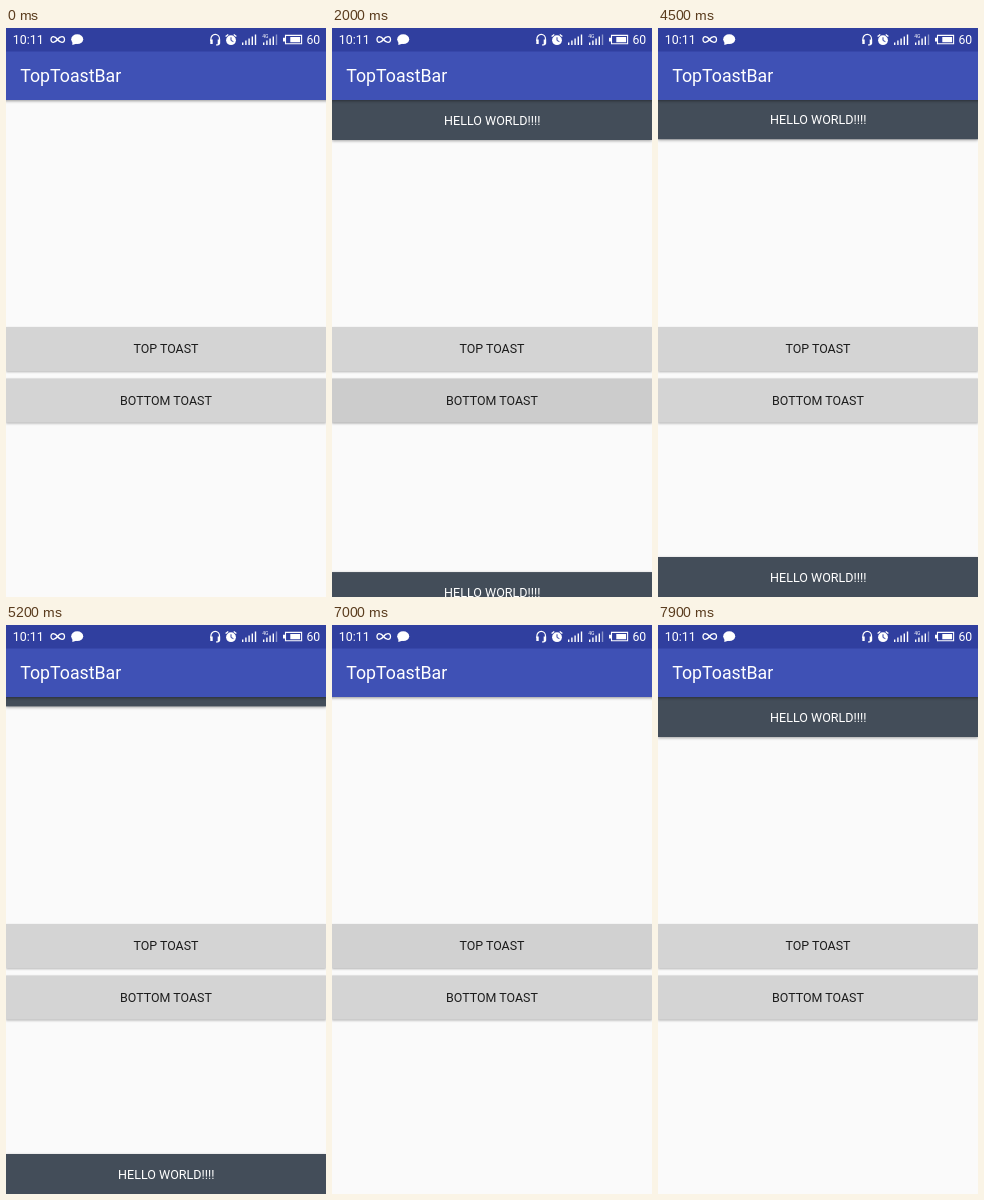
These frames come from a looping animation (320 px wide and 569 px high, 8000 ms). An HTML page:

```html
<!DOCTYPE html>
<html lang="en">
<meta charset="utf-8">
<title>Toast bars</title>
<style>
  html, body { margin: 0; height: 100%; overflow: hidden; background: #fafafa; }
  svg { display: block; width: 100vw; height: 100vh; font-family: Roboto, sans-serif; }
  .label { font-size: 12.44px; text-anchor: middle; }
  .toast { fill: #434d59; filter: drop-shadow(0 1px 1.5px rgba(0, 0, 0, .35)); }
  .bar { filter: drop-shadow(0 1.5px 1.8px rgba(0, 0, 0, .4)); }
  .button { fill: #d4d4d4; filter: drop-shadow(0 1px 1px rgba(0, 0, 0, .28)); }
  .line { fill: none; stroke: #fff; }
</style>
<svg viewBox="0 0 320 569" preserveAspectRatio="none">
  <rect width="320" height="569" fill="#fafafa"/>

  <rect class="button" y="299" width="320" height="44"/>
  <rect class="press" y="299" width="320" height="45" opacity="0"/>
  <text class="label" x="160" y="325.4" fill="#1c1c1c">TOP TOAST</text>
  <rect class="button" y="350.5" width="320" height="44"/>
  <rect class="press" y="350.5" width="320" height="45" opacity="0"/>
  <text class="label" x="160" y="376.9" fill="#1c1c1c">BOTTOM TOAST</text>

  <g id="top">
    <rect class="toast" y="72" width="320" height="40"/>
    <text class="label" x="160.3" y="96.9" fill="#fff" style="font-size:12.55px">HELLO WORLD!!!!</text>
  </g>
  <g id="bottom">
    <rect class="toast" y="529" width="320" height="40"/>
    <text class="label" x="160.3" y="553.7" fill="#fff" style="font-size:12.55px">HELLO WORLD!!!!</text>
  </g>

  <rect class="bar" x="-6" width="332" height="72" fill="#3f51b5"/>
  <rect width="320" height="23.5" fill="#303f9f"/>
  <text x="14.2" y="54" font-size="17.78" fill="#fff">TopToastBar</text>

  <!-- status icons -->
  <g fill="#fff">
    <text x="6.8" y="15.8" font-size="12.4">10:11</text>
    <text x="300.4" y="15.8" font-size="12.2">60</text>
    <path class="line" stroke-width="1.3" d="M51.5 11.5C49 8 45 7.5 45 11.5S49 15 51.5 11.5S58.5 7.5 58.5 11.5S54 15 51.5 11.5Z"/>
    <ellipse cx="71.2" cy="11.2" rx="6" ry="4.9"/>
    <path d="M66.5 13L66.3 17L71 15.5Z"/>
    <path class="line" stroke-width="1.2" d="M204.9 13V11A4.3 4.6 0 0 1 213.5 11V15Q213.5 17 210 17"/>
    <path d="M204.3 11.5h2.4v4.5h-2.4zM211.7 11.5h2.4v4.5h-2.4z"/>
    <circle cx="225" cy="12.2" r="4.9"/>
    <path class="line" stroke-width="1.3" d="M219.6 8.6L222.3 6.4M230.4 8.6L227.7 6.4"/>
    <path class="line" style="stroke:#303f9f" d="M225 9.3V12.5L227.4 13.6"/>
    <g id="signal"></g>
    <text x="256.2" y="10" font-size="5">4G</text>
    <path class="line" stroke-width="1.1" d="M279.5 7.4H295.6V15.8H279.5Z"/>
    <path d="M277 9.8h2v3.8h-2zM284.3 9h9.8v5.3h-9.8z"/>
  </g>
</svg>
<script>
  const LOOP = 8000, HEIGHT = 40;
  const clamp = x => Math.min(1, Math.max(0, x));
  const byId = id => document.getElementById(id);
  const presses = document.querySelectorAll('.press');

  // Two rows of five rising signal bars.
  const bars = (x, dim) => Array.from({ length: 5 }, (_, i) => {
    const h = 2.5 + i * 2;
    return `<rect x="${x + i * 3.2}" y="${17 - h}" width="1.4" height="${h}" opacity="${i >= dim ? .45 : 1}"/>`;
  }).join('');
  byId('signal').innerHTML = bars(236, 5) + bars(257, 4);

  // How far a toast is hidden: 0 is fully in, 1 fully out.
  const slideIn = (t, start, span) => (1 - clamp((t - start) / span)) ** 3;
  const slideOut = (t, start, span) => clamp((t - start) / span) ** 2;

  function topHidden(t) {
    if (t >= 7000) return slideIn(t, 7040, 850);
    if (t >= 5300) return 1;
    return t < 4300 ? slideIn(t, 640, 860) : slideOut(t, 4370, 950);
  }

  function bottomHidden(t) {
    if (t >= 6400) return 1;
    return t < 5500 ? slideIn(t, 1740, 940) : slideOut(t, 5560, 870);
  }

  function press(t, start) {
    const d = t - start;
    return d < 0 ? 0 : .1 * Math.min(clamp(d / 120), clamp((450 - d) / 330));
  }

  function place(id, hidden, direction) {
    const node = byId(id);
    node.setAttribute('transform', `translate(0 ${direction * hidden * HEIGHT})`);
    node.setAttribute('visibility', hidden === 1 ? 'hidden' : 'visible');
  }

  function draw(now) {
    const t = now % LOOP;
    place('top', topHidden(t), -1);
    place('bottom', bottomHidden(t), 1);
    presses[0].setAttribute('opacity', Math.max(press(t, 580), press(t, 6980)));
    presses[1].setAttribute('opacity', press(t, 1680));
    requestAnimationFrame(draw);
  }
  requestAnimationFrame(draw);
</script>
</html>
```
